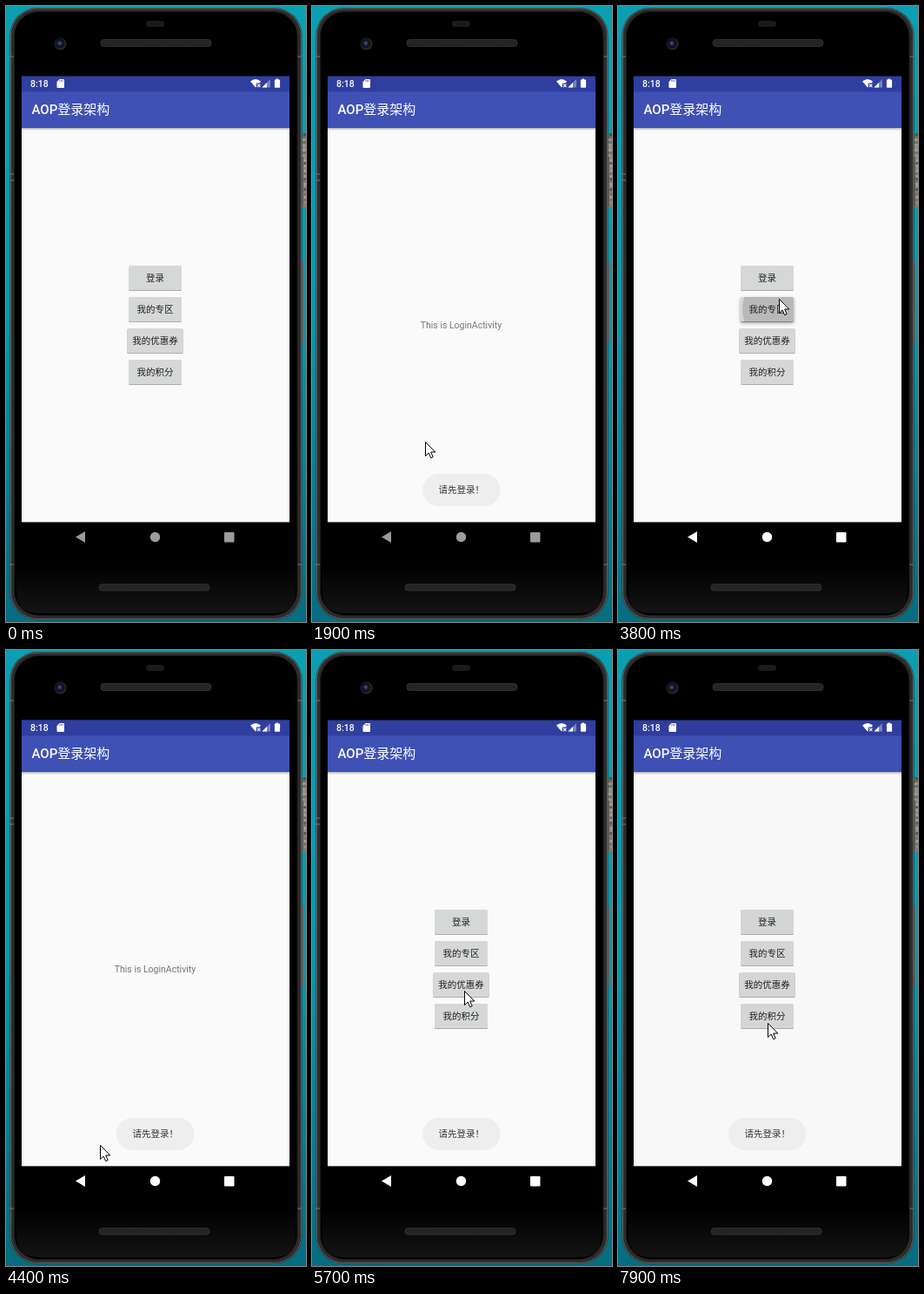
Animation, 345 px wide and 707 px high, one loop 8000 ms. Source, as an HTML page:

```html
<!DOCTYPE html>
<html lang="zh-CN">
<head>
<meta charset="utf-8">
<title>AOP登录架构</title>
<style>
  html, body { margin: 0; width: 100%; height: 100%; overflow: hidden; background: #0898ac; }
  svg { display: block; width: 345px; height: 707px; }
  text { font: 10.5px Roboto, "Noto Sans CJK SC", sans-serif; }
  .title { font-size: 15px; fill: #fff; }
  .medium { font-weight: 500; }
  .mid { text-anchor: middle; }
  .mesh { fill: url(#mesh); stroke: #383838; stroke-width: .7; }
</style>
</head>
<body>
<svg viewBox="0 0 345 707" xmlns="http://www.w3.org/2000/svg">
  <defs>
    <linearGradient id="sea" x2="0" y2="1">
      <stop offset="0" stop-color="#0b9fb1"/>
      <stop offset=".5" stop-color="#0899ad"/>
      <stop offset="1" stop-color="#066c80"/>
    </linearGradient>
    <linearGradient id="shade" x2="0" y2="1">
      <stop offset="0" stop-color="#000" stop-opacity=".28"/>
      <stop offset="1" stop-color="#000" stop-opacity="0"/>
    </linearGradient>
    <linearGradient id="chin" x2="0" y2="1">
      <stop offset=".15" stop-color="#000"/>
      <stop offset="1" stop-color="#141414"/>
    </linearGradient>
    <radialGradient id="lens" cx=".45" cy=".45">
      <stop offset="0" stop-color="#4a5f9c"/>
      <stop offset=".35" stop-color="#1a2340"/>
      <stop offset=".6" stop-color="#0b0d14"/>
      <stop offset="1" stop-color="#29292b"/>
    </radialGradient>
    <pattern id="mesh" width="3" height="3" patternUnits="userSpaceOnUse">
      <rect width="3" height="3" fill="#2b2b2b"/>
      <path d="M0 3L3 0" stroke="#171717"/>
    </pattern>
    <clipPath id="screen"><rect x="18" y="80.4" width="308" height="548"/></clipPath>
    <clipPath id="reveal"><rect id="revealBox" x="18" width="308"/></clipPath>
    <clipPath id="btnClip"><rect id="btnBox" height="28" rx="1.5"/></clipPath>
    <g id="window">
      <rect x="18" y="592" width="308" height="37"/>
      <rect x="18" y="139" width="308" height="453.4" fill="#fafafa"/>
      <rect x="18" y="97" width="308" height="43" fill="#3f51b5"/>
      <rect x="18" y="80" width="308" height="18.4" fill="#303f9f"/>
      <rect x="18" y="140" width="308" height="3" fill="url(#shade)"/>
      <text class="title" x="29.5" y="124"><tspan class="medium">AOP</tspan>登录架构</text>
    </g>
  </defs>

  <rect width="345" height="707" fill="url(#sea)"/>
  <g id="rocks"></g>

  <path d="M339 173h3.5v57H339zM339 293h3.5v93H339z" fill="#6b6b6b"/>
  <rect x="4.5" y="2" width="336" height="702.5" rx="32" fill="#2c2c2c"/>
  <rect x="5.5" y="3" width="334" height="700.5" rx="31" fill="none" stroke="#626262"/>
  <path d="M4.5 58h6M334 58h6M4.5 193h5M4.5 200h5M4.5 641h6M334 641h6" stroke="#7a7a7a"/>
  <rect x="9.5" y="6.5" width="325.5" height="693" rx="28" stroke="#1b1b1b"/>
  <path d="M12 630H333V672Q333 697 307 697H38Q12 697 12 672Z" fill="url(#chin)"/>
  <rect x="161" y="17" width="21" height="7" rx="3.5" fill="#1a1a1a"/>
  <circle cx="62.5" cy="43.5" r="7" fill="url(#lens)"/>
  <rect class="mesh" x="109" y="38.5" width="127" height="8" rx="3.5"/>
  <rect class="mesh" x="107" y="663.5" width="127" height="7.5" rx="3.5"/>

  <g clip-path="url(#screen)">
    <rect x="18" y="80" width="308" height="549"/>
    <g id="main">
      <use href="#window"/>
      <g id="buttons"></g>
      <g clip-path="url(#btnClip)"><circle id="ripple" fill="#000" fill-opacity=".14"/></g>
      <g id="labels" fill="#212121"></g>
    </g>
    <g id="login">
      <g clip-path="url(#reveal)">
        <use href="#window"/>
        <text class="mid" x="171.5" y="370" fill="#757575">This is LoginActivity</text>
      </g>
    </g>

    <g id="toast">
      <rect x="127" y="537" width="89.5" height="37" rx="18.5" fill="#eee"/>
      <text x="145.5" y="559" fill="#333">请先登录！</text>
    </g>

    <g fill="#fff">
      <text class="medium" x="28" y="93">8:18</text>
      <path d="M61.5 84H66q1 0 1 1v8q0 1-1 1h-6.5q-1 0-1-1v-6z"/>
      <path d="M61.8 85v2M63.5 85v2M65.2 85v2" stroke="#303f9f" stroke-width=".7"/>
      <path d="M281 86.5Q287 81.5 293 86.5L291.5 88.5H287.8V92.5L287 93.5z"/>
      <path d="M289 89.7l3.4 3.4M292.4 89.7l-3.4 3.4" stroke="#fff" stroke-width="1.1"/>
      <path d="M304 84v9.5h-9.5z" fill-opacity=".35"/>
      <path d="M300 88v5.5h-5.5z"/>
      <path d="M310.5 83.5H313v1h1.5q.6 0 .6.6v8q0 .6-.6.6h-5q-.6 0-.6-.6v-8q0-.6.6-.6h1z"/>
    </g>

    <rect id="navPress" x="48" y="592" width="76" height="36" rx="18" fill="#fff"/>
    <g id="nav">
      <path d="M80 609.5L91 603V616z"/>
      <circle cx="171.5" cy="609.5" r="5.7"/>
      <rect x="251" y="604" width="11.5" height="11.5" rx="1"/>
    </g>
  </g>

  <path id="cursor" d="M.5.5V16.5L4.2 13 6.7 18.7 9.2 17.6 6.7 12H11.8z" fill="#fff" stroke="#000"/>
</svg>
<script>
const LOOP = 8000, STEP = 100, ANIM = 425, TOP = 80, HEIGHT = 548, MID = 171.5;
const $ = id => document.getElementById(id);
const clamp = v => Math.max(0, Math.min(1, v));
const mix = (a, b, k) => a + (b - a) * k;
const set = (el, attrs) => { for (const k in attrs) el.setAttribute(k, attrs[k]); };

function add(parent, tag, attrs) {
  const el = document.createElementNS('http://www.w3.org/2000/svg', tag);
  set(el, attrs);
  return parent.appendChild(el);
}

const buttons = ['登录', '我的专区', '我的优惠券', '我的积分'].map((label, i) => {
  const width = Math.max(61, 12 + 10.5 * label.length);
  const box = { x: MID - width / 2, y: 298 + 36 * i, width };
  const layer = (dy, attrs) =>
    add($('buttons'), 'rect', { ...box, y: box.y + dy, height: 28, rx: 1.5, ...attrs });
  const lift = layer(2, { style: 'filter:blur(2px)' });
  layer(1, { opacity: .3, style: 'filter:blur(.7px)' });
  layer(0, { fill: '#d6d7d7' });
  add($('labels'), 'text', { x: MID, y: box.y + 17.6, class: 'mid' }).textContent = label;
  return { box, lift };
});

// Seeded shoreline at the right edge
let seed = 7;
const rand = () => (seed = seed * 16807 % 2147483647) / 2147483647;
for (let y = 146; y < 230; y += 3) {
  const light = 30 + 35 * rand();
  add($('rocks'), 'rect', { x: 339 + 3 * rand(), y, width: 6, height: 4, fill: `hsl(35 14% ${light}%)` });
}

// Each visit: press a button, login opens, pointer reaches Back, Back is pressed, login closes
const visits = [
  { button: 1, at: [189, 346], press: 1200, open: 1520, arrive: 2400, exit: [89, 606], back: 2900, close: 3020 },
  { button: 1, at: [185, 336], press: 3800, open: 3850, arrive: 4800, exit: [93, 615], back: 5100, close: 5250 },
  { button: 2, at: [175, 391], press: 5900, open: 6080, arrive: 7200, exit: [90, 608], back: 7300, close: 7515 }
];
const after = i => visits[i + 1] || { at: [172, 428], press: LOOP };

const trips = [{ start: 150, end: 800, from: [360, 314], to: visits[0].at }];
visits.forEach((v, i) => trips.push(
  { start: v.open + 60, end: v.arrive, from: v.at, to: v.exit },
  { start: v.close + 50, end: v.close + 400, from: v.exit, to: after(i).at }
));

const bez = (a, b, c, d, u) => {
  const v = 1 - u;
  return a * v * v * v + 3 * b * v * v * u + 3 * c * v * u * u + d * u * u * u;
};

function curve(x, xs, ys) {
  let lo = 0, hi = 1;
  for (let i = 0; i < 24; i++) {
    const m = (lo + hi) / 2;
    if (bez(...xs, m) < x) lo = m; else hi = m;
  }
  return bez(...ys, lo);
}

const slowIn = x => curve(x, [0, .4, .2, 1], [0, 0, 1, 1]);
const extraSlowIn = x => x < 1 / 6
  ? curve(x, [0, .05, .1333, 1 / 6], [0, 0, .06, .4])
  : curve(x, [1 / 6, .2083, .25, 1], [.4, .82, 1, 1]);

function drawWindows(t, visit) {
  const opening = visit && t < visit.close;
  const start = !visit ? -ANIM : opening ? visit.open : visit.close;
  const k = clamp((t - start) / ANIM);
  const away = p => opening ? p : 1 - p;
  const slide = away(slowIn(k));
  const cut = Math.round(.959 * HEIGHT * (1 - away(extraSlowIn(k))));
  set($('main'), {
    transform: `translate(0 ${Math.round(-.02 * HEIGHT * slide)})`,
    opacity: 1 - .1 * away(k)
  });
  set($('login'), {
    transform: `translate(0 ${Math.round(.041 * HEIGHT * (1 - slide))})`,
    visibility: !opening && k === 1 ? 'hidden' : 'visible'
  });
  set($('revealBox'), { y: TOP + cut, height: HEIGHT + 1 - cut });
}

function drawPresses(t) {
  const hit = visits.find(v => t >= v.press && t < v.open + 200);
  buttons.forEach((b, i) => set(b.lift, { opacity: hit && hit.button === i ? .35 : 0 }));
  set($('ripple'), { r: 0 });
  if (hit) {
    const { box } = buttons[hit.button];
    set($('btnBox'), box);
    set($('ripple'), { cx: hit.at[0], cy: box.y + 14, r: Math.min(70, 42 + (t - hit.press) / 10) });
  }
  const held = visits.find(v => t >= v.back && t < v.back + 500);
  const age = held ? t - held.back + 50 : 0;
  set($('navPress'), { opacity: .115 * clamp(age / 150) * clamp((550 - age) / 250) });
  set($('nav'), { fill: t < visits[0].back ? '#9b9b9b' : '#fff' });
}

function drawPointer(t) {
  const trip = trips.filter(p => p.start <= t).pop() || trips[0];
  const k = slowIn(clamp((t - trip.start) / (trip.end - trip.start)));
  const pos = trip.from.map((a, i) => Math.round(mix(a, trip.to[i], k)));
  set($('cursor'), { transform: `translate(${pos})` });
}

function draw(t) {
  const i = visits.filter(v => v.open <= t).length - 1, visit = visits[i];
  drawWindows(t, visit);
  drawPresses(t);
  drawPointer(t);
  const shown = visit && t < after(i).press;
  set($('toast'), { opacity: shown ? clamp((t - visit.open - 50) / 250) : 0 });
}

const begin = performance.now();
function tick() {
  const t = (performance.now() - begin) % LOOP;
  draw(Math.floor(t / STEP) * STEP);
  requestAnimationFrame(tick);
}
tick();
</script>
</body>
</html>
```
